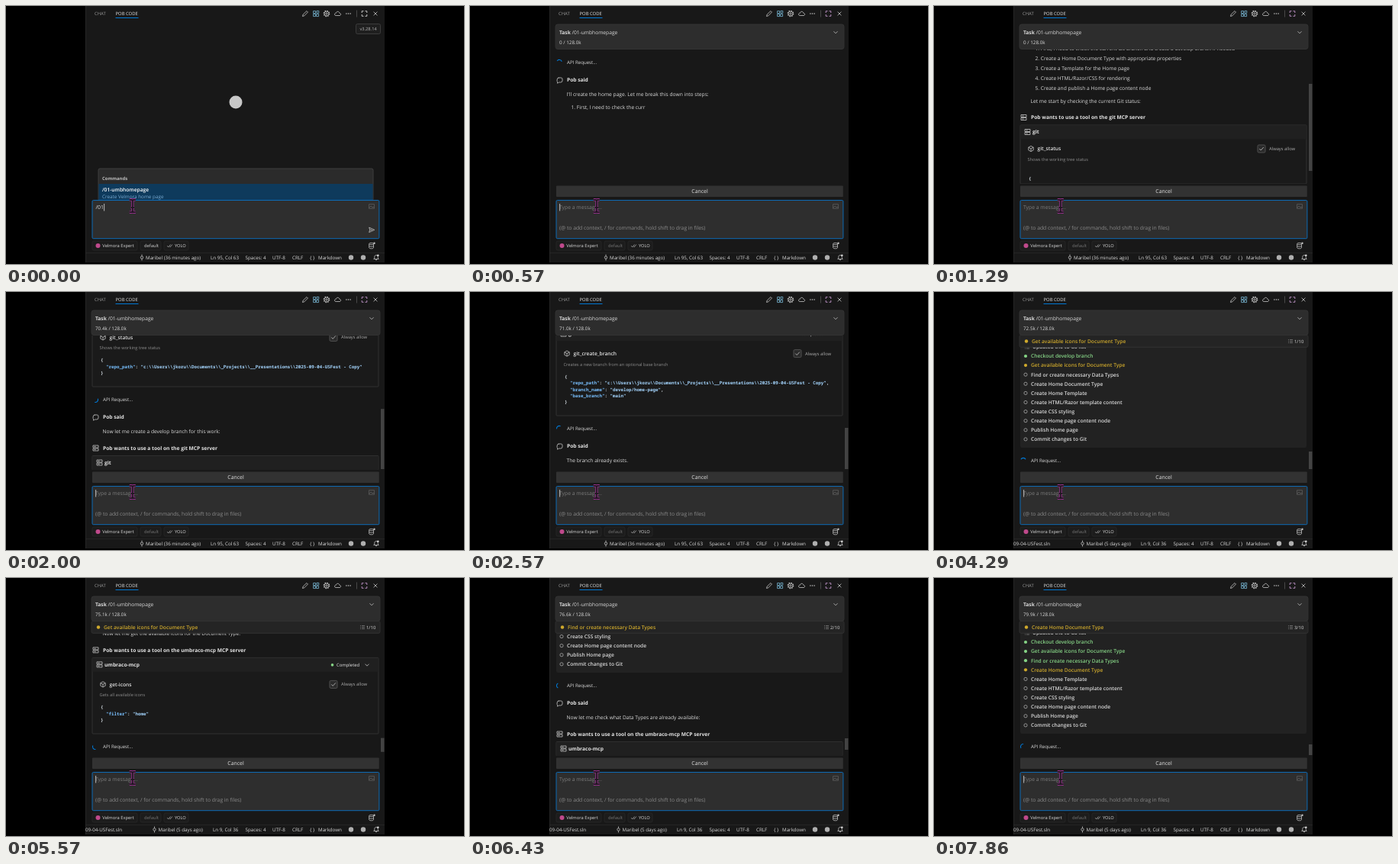
Animation, 600 px wide and 338 px high, one loop 8000 ms. Source, as an HTML page:

```html
<!DOCTYPE html>
<html lang="en">
<head>
<meta charset="utf-8">
<title>Assistant panel</title>
<style>
  html, body { margin: 0; width: 100%; height: 100%; overflow: hidden; background: #000; }
  svg { display: block; width: 100vw; height: 100vh; }
  text { font-family: "Open Sans", "Noto Sans", sans-serif; white-space: pre; text-rendering: geometricPrecision; }
  text.mono { font-family: "Noto Sans Mono", "DejaVu Sans Mono", monospace; }
</style>
</head>
<body>
<svg id="stage" viewBox="0 0 600 338"></svg>
<script>
const LOOP = 8000, STEPS = 56, BOTTOM = 233;
const BLUE = '#0078d4', GREEN = '#86d486', YELLOW = '#cfa92c', GREY = '#8c8c8c', LIGHT = '#dadada', LINE = '#c4c4c4';

// Drawing helpers; text is placed by its vertical centre
const text = (x, y, str, fill = LIGHT, size = 6.66, weight = 400, extra = '') =>
  `<text x="${x}" y="${y + size * .36}" fill="${fill}" font-size="${size}" font-weight="${weight}" ${extra}>${str}</text>`;
const rect = (x, y, w, h, fill, stroke = 'none', r = 0) =>
  `<rect x="${x}" y="${y}" width="${w}" height="${h}" rx="${r}" fill="${fill}" stroke="${stroke}" stroke-width=".9"/>`;
const circle = (x, y, r, fill, stroke = 'none') =>
  `<circle cx="${x}" cy="${y}" r="${r}" fill="${fill}" stroke="${stroke}" stroke-width=".8"/>`;
const line = (d, stroke = LINE, width = .8, fill = 'none') =>
  `<path d="${d}" fill="${fill}" stroke="${stroke}" stroke-width="${width}"/>`;
const at = (x, y, body) => `<g transform="translate(${x} ${y})">${body}</g>`;

// Keyed values: held until the next key, or blended between keys
const held = (keys, s) => keys.filter(k => k[0] <= s).pop()[1];
const blend = (keys, s, col = 1) => {
  const i = keys.findIndex(k => k[0] >= s);
  if (i < 0) return keys[keys.length - 1][col];
  if (i === 0) return keys[0][col];
  const a = keys[i - 1], b = keys[i];
  return a[col] + (b[col] - a[col]) * (s - a[0]) / (b[0] - a[0]);
};

const TOKENS = [[0, '0'], [11, '70.4k'], [16, '71.0k'], [22, '71.4k'], [27, '72.5k'], [38, '75.1k'], [42, '76.6k'], [52, '79.9k']];
const SPIN = [[2, -900], [18, -125], [24, 315], [30, 630], [45, 1620], [55, 2370]];
const THUMB = [[6, 57, 233], [9, 102, 216], [13, 147, 232], [18, 178, 232], [24, 192, 232], [30, 209, 232], [45, 210, 225], [55, 218, 232]];
const PROGRESS = [[0, 0], [27, 1], [42, 2], [52, 3]];
const TODOS = ['Checkout develop branch', 'Get available icons for Document Type', 'Find or create necessary Data Types',
  'Create Home Document Type', 'Create Home Template', 'Create HTML/Razor template content', 'Create CSS styling',
  'Create Home page content node', 'Publish Home page', 'Commit changes to Git'];

const icon = {
  server: line('M-3.5-3.5h7v3h-7zM-3.5.5h7v3h-7zM-2-2h2M-2 2h2'),
  bubble: line('M-2-3H2Q3.5-3 3.5-1V1Q3.5 3 1 3H-1L-3 4.2V2.5Q-3.5 2-3.5 0Q-3.5-3-1-3'),
  cube: line('M0-3.6L3.2-1.8V1.8L0 3.6-3.2 1.8V-1.8ZM-3.2-1.8L0 0 3.2-1.8M0 0V3.6'),
  chevron: line('M-2.5-1.2L0 1.3 2.5-1.2'),
  list: line('M-1-2H3M-1 0H3M-1 2H3M-3-2h1M-3 0h1M-3 2h1', GREY, .7),
  commit: circle(0, 0, 1.7, 'none', LINE) + line('M0-4V-1.7M0 1.7V4'),
};

// Transcript blocks: each returns [height, markup]
const blocks = {
  api: (e, s) => [29, at(117, 17, s >= e.done
    ? line('M-2.5 0L-.7 2 3-2', GREEN)
    : `<g transform="rotate(${blend(SPIN, s)})">${line('M1.7-3.1A3.5 3.5 0 0 1 1.7 3.1', BLUE, 1.1)}</g>`)
    + text(127, 17, s >= e.done ? 'API Request' : 'API Request...', LIGHT, 6.15)],

  said(e, s) {
    let left = (s - e.at + 1) * e.rate, y = 30, previous = null;
    let body = at(117.5, 11, icon.bubble) + text(127, 11, 'Pob said', '#e4e4e4', 6.66, 700);
    for (const str of e.lines) {
      if (left <= 0) break;
      const numbered = /^\d/.test(str);
      if (previous !== null) y += numbered && previous ? 13 : 17;
      body += text(numbered ? 132.5 : 126.5, y, str.slice(0, left));
      left -= str.length;
      previous = numbered;
    }
    return [y + 12, body];
  },

  wants: e => [19.5, at(117.5, 9.5, icon.server)
    + text(127, 9.5, `Pob wants to use a tool on the ${e.server} MCP server`, '#e4e4e4', 6.66, 700)],

  tool(e, s) {
    const done = s >= e.done, stage = s - e.at, shift = done ? 4 : 0;
    const shown = done ? e.args : e.args.slice(0, Math.max(0, stage - 1));
    const jsonY = done ? 65 : 70;
    const h = done ? 91.2 + 8.4 * e.args.length : stage < 1 ? 18.5 : 77 + 8.4 * shown.length;
    let body = rect(113, 0, 375, h, '#1a1a1a', '#343434', 1) + rect(113.4, .4, 374.2, 18, '#202020')
      + at(122.5, 9, icon.server) + text(129, 9, e.server, '#e4e4e4', 6.66, 700);
    if (done) body += circle(427.5, 9.5, 1.8, GREEN) + text(433, 9, 'Completed', '#e4e4e4', 5.9) + at(473, 9.5, icon.chevron);
    if (!done && stage < 1) return [h, body];
    body += at(127, 31 + shift, icon.cube) + text(135.5, 31 + shift, e.name, '#e4e4e4', 6.66, 600)
      + rect(424, 26 + shift, 10, 10, '#2b2b2b', '#555', 1.5) + at(429, 31 + shift, line('M-2.7 0L-.8 2 2.8-2'))
      + text(439, 31 + shift, 'Always allow', '#adadad', 5.8)
      + text(122.5, 45 + shift, e.desc, GREY, 5.7);
    const mono = (x, i, str) => text(x, jsonY + i * 8.45, str, '#d6dde4', 5.84, 600, 'class="mono"');
    body += mono(124, 0, '{');
    shown.forEach(([key, value], i) => body += mono(131, i + 1,
      `<tspan fill="#79c0ff">"${key}"</tspan>: <tspan fill="#a5d6ff">"${value}"</tspan>${i < e.args.length - 1 ? ',' : ''}`));
    if (done) body += mono(124, shown.length + 1, '}');
    return [h, body];
  },

  todo(e) {
    let body = rect(113, 0, 375, 142, '#222', 'none', 2) + at(122, 10, icon.list) + text(129, 10, 'Updated the to-do list', LIGHT, 6.66, 600);
    TODOS.forEach((str, i) => {
      const color = i < e.count ? GREEN : i === e.count ? YELLOW : LIGHT, y = 22 + i * 12.1;
      body += circle(120, y, 2.1, i <= e.count ? color : 'none', i <= e.count ? 'none' : '#aaa')
        + text(127, y, str, color, 6.66, 600);
    });
    return [142, body];
  },
};

const REPO = ['repo_path', 'c:\\\\Users\\\\jkoru\\\\Documents\\\\_Projects\\\\__Presentations\\\\2025-09-04-USFest - Copy'];
const api = (at, done) => ({ kind: 'api', at, done });
const said = (at, rate, ...lines) => ({ kind: 'said', at, rate, lines });
const todo = (at, count) => ({ kind: 'todo', at, count });
const tool = (at, done, server, name, desc, ...args) =>
  [{ kind: 'wants', at: at - 1, server }, { kind: 'tool', at, done, server, name, desc, args }];

const TRANSCRIPT = [
  api(2, 11),
  said(4, 95, "I'll create the home page. Let me break this down into steps:",
    '1. First, I need to check the current Git branch and create a develop branch if needed',
    '2. Create a Home Document Type with appropriate properties',
    '3. Create a Template for the Home page',
    '4. Create HTML/Razor/CSS for rendering',
    '5. Create and publish a Home page content node',
    'Let me start by checking the current Git status:'),
  ...tool(8, 11, 'git', 'git_status', 'Shows the working tree status', REPO),
  api(11, 16),
  said(12, 30, 'Now let me create a develop branch for this work:'),
  ...tool(14, 16, 'git', 'git_create_branch', 'Creates a new branch from an optional base branch',
    REPO, ['branch_name', 'develop/home-page'], ['base_branch', 'main']),
  api(16, 22),
  said(17, 13, 'The branch already exists. Let me switch to it:'),
  ...tool(20, 22, 'git', 'git_checkout', 'Switches branches', REPO, ['branch_name', 'develop/home-page']),
  api(22, 27),
  said(23, 25, "Good! Now I'm on the develop branch. Let me create a todo list to track the work:"),
  todo(27, 1),
  api(27, 38),
  said(32, 26, 'Now let me get the available icons for the Document Type:'),
  ...tool(35, 38, 'umbraco-mcp', 'get-icons', 'Gets all available icons', ['filter', 'home']),
  api(38, 42),
  todo(42, 2),
  api(42, 48),
  said(43, 30, 'Now let me check what Data Types are already available:'),
  ...tool(45, 48, 'umbraco-mcp', 'get-all-data-types', 'Gets all available data types', ['take', '100']),
  api(48, 52),
  todo(52, 3),
  api(52, 60),
];

function transcript(s) {
  let y = BOTTOM, out = '';
  const shown = TRANSCRIPT.filter(e => e.at <= s);
  while (shown.length && y > 50) {
    const e = shown.pop(), [h, body] = blocks[e.kind](e, s);
    y -= h;
    out += at(0, y, body);
  }
  // Short transcripts sit at the top
  return at(0, Math.min(0, 57 - y), out);
}

function toolbar(idle) {
  const gear = circle(0, 0, 3, 'none', LINE) + circle(0, 0, 1.2, 'none', LINE)
    + `<circle r="3.7" fill="none" stroke="${LINE}" stroke-width="1.2" stroke-dasharray="1.45 1.45"/>`;
  return text(116, 10, 'CHAT', '#9a9a9a', 5.9) + text(143.5, 10, 'POB CODE', '#e4e4e4', 5.9)
    + rect(143.5, 15, 30, 1, BLUE)
    + at(392, 10, line('M-3.5 3.5L-2.8 1 2-3.5 3.5-2-1.2 2.8Z'))
    + at(406, 10, line('M-3.4-3.4h3v3h-3zM-3.4.6h3v3h-3zM.6.6h3v3h-3zM1-3.6h2.8v2.8H1z', '#79b9d6', .8))
    + at(420, 10, gear)
    + at(434.5, 10, line('M-2.3 2.5C-5 2.3-4.3-1-2-.8C-1.5-3.5 2-3.2 2.2-.8C4.8-.7 4.5 2.5 2.5 2.5Z'))
    + [-2.6, 0, 2.6].map(d => circle(448.5 + d, 10, .8, LINE)).join('')
    + rect(459, 5.5, .8, 9, '#555')
    + at(469.5, 10, line('M-3.3-1V-3.3H-1M1-3.3H3.3V-1M3.3 1V3.3H1M-1 3.3H-3.3V1', idle ? LINE : '#b48cbd', 1))
    + at(484, 10, line('M-2.4-2.4L2.4 2.4M2.4-2.4L-2.4 2.4'));
}

function taskHeader(s) {
  const count = held(PROGRESS, s);
  let out = rect(112, 24, 378, 32.5, '#2d2d2d', '#353535', 3)
    + text(117, 34.5, '<tspan font-weight="700">Task</tspan> /01-umbhomepage')
    + at(479, 34.5, icon.chevron) + text(117, 47.5, held(TOKENS, s) + ' / 128.0k', LIGHT, 6.3);
  if (count) out += rect(112, 56.5, 378, 15.8, '#242424', '#333', 2) + circle(121, 64.5, 2.2, YELLOW)
    + text(128, 64.5, TODOS[count], YELLOW, 6.66, 600)
    + at(467, 64.5, icon.list) + text(472, 64.5, count + '/10', LIGHT, 5.9);
  return out;
}

const welcome = () => rect(458.5, 23.5, 32, 13, '#1f1f1f', '#404040', 2) + text(463.5, 30, 'v3.28.14', '#b5b5b5', 5.7)
  + circle(301, 126, 8.5, '#c8c8c8');

const popup = () => rect(121, 213, 360, 42, '#2b2b2b', '#424242', 2) + text(126, 225.5, 'Commands', '#bdbdbd', 5.9, 700)
  + rect(121.4, 233, 359.2, 21.5, '#0e3a5c') + text(126, 240.5, '/01-umbhomepage', '#fff', 6.66, 600)
  + text(126, 249.3, 'Create Velmora home page', '#78aad2', 6.35);

function inputBox(s, idle) {
  const typed = s === 0 ? '/01' : '/01-umbhomepage';
  let out = rect(113, 254.5, 375.9, 50.2, '#2e2e2e', '#0b72c4', 1.5);
  out += idle ? text(117.5, 263.5, typed, '#e4e4e4', 6.9)
    : text(117, 264, 'Type a message...', '#7c7c7c', 6.8)
      + text(117, 290.5, '(@ to add context, / for commands, hold shift to drag in files)', '#8a8a8a', 6.8);
  if (s % 4 !== 1) out += rect(idle ? 128.3 : 117.3, 259, .8, 9.5, '#ddd');
  out += at(479, 262.5, line('M-3.4-2.8H3.4V2.8H-3.4ZM-3.4 2L-1-.5 1 1.5 2 .5 3.4 2', '#666', .7));
  if (idle) out += at(479, 293.3, line('M-3.3-3.2L3.7 0-3.3 3.2-2.3 0ZM-2.3 0H1'));
  return out;
}

function modeBar(idle) {
  const pill = (x, w) => rect(x, 308, w, 12, '#1c1c1c', '#282828', 2);
  return pill(113, 59) + pill(176, 27) + pill(207, 32)
    + circle(120.5, 314, 3, '#c0498c') + text(126.3, 314, 'Velmora Expert', LIGHT, 5.8)
    + text(181, 314, 'default', idle ? LIGHT : '#777', 5.75)
    + at(214.5, 314, line('M-3.3.2L-1.8 1.8 1-1.5M0 1.2L.5 1.8 3.3-1.5', LINE, .7)) + text(221, 314, 'YOLO', LIGHT, 5.7)
    + at(479, 314, line('M-3.3-2.5C-3.3-4 2.5-4 2.5-2.5V2.8C2.5 4.2-3.3 4.2-3.3 2.8ZM-3.3-2.5C-3.3-1 2.5-1 2.5-2.5M-3.3 .2C-3.3 1.6 2.5 1.6 2.5 .2'))
    + circle(482.5, 310.8, 1.2, LINE);
}

function statusBar(s) {
  const moved = s >= 22, item = (x, str) => text(x, 329.5, str, LIGHT, 6.24);
  return rect(104, 323, 392, .7, '#2b2b2b')
    + (moved ? item(104, '09-04-USFest.sln') : '')
    + at(moved ? 194.5 : 178, 329.5, icon.commit)
    + item(moved ? 199.5 : 183, moved ? 'Maribel (5 days ago)' : 'Maribel (36 minutes ago)')
    + (moved ? item(271, 'Ln 9, Col 36') : item(268, 'Ln 95, Col 63'))
    + item(313.5, 'Spaces: 4') + item(349, 'UTF-8') + item(375, 'CRLF')
    + item(398, '{ }') + item(409, 'Markdown')
    + circle(452, 329.5, 3.2, '#b0b0b0') + circle(468, 329.5, 3.2, '#b0b0b0')
    + at(485, 329.5, line('M-3.2 2H3.2L2.2.5V-1C2.2-3.8-2.2-3.8-2.2-1V.5ZM-1 2.8Q0 4 1 2.8')) + circle(487.3, 326.8, 1.3, LIGHT);
}

// Dark I-beam with a coloured rim
const pointer = () => {
  const beam = 'M161.8 253.8H164.2Q165.8 253.8 165.8 256V268Q165.8 270.2 164.2 270.2H161.8M169.8 253.8H167.4Q165.8 253.8 165.8 256M169.8 270.2H167.4Q165.8 270.2 165.8 268M163.6 264.2H168';
  return line(beam, '#96318c', 3.4) + line(beam, '#1f171f', 1.8);
};

function frame(s) {
  const idle = s < 2, top = held(PROGRESS, s) ? 72 : 57;
  let out = `<clipPath id="panel">${rect(104, 0, 392, 336)}</clipPath>
    <clipPath id="chat">${rect(104, top, 392, BOTTOM - top)}</clipPath>`;
  let body = rect(104, 0, 392, 336, '#181818') + rect(104, 0, .7, 336, '#2b2b2b') + toolbar(idle);
  if (idle) body += welcome() + (s === 0 ? popup() : '');
  else {
    const thumbTop = blend(THUMB, s), thumbEnd = blend(THUMB, s, 2);
    body += `<g clip-path="url(#chat)">${transcript(s)}</g>` + taskHeader(s)
      + (s > 6 ? rect(491, thumbTop, 4.5, thumbEnd - thumbTop, '#434343') : '')
      + rect(113, 235.5, 375.8, 14.5, '#323232', 'none', 1)
      + text(301, 243, 'Cancel', '#e4e4e4', 6.9, 400, 'text-anchor="middle"');
  }
  body += inputBox(s, idle) + modeBar(idle) + statusBar(s) + pointer();
  return out + `<g clip-path="url(#panel)">${body}</g>`;
}

const stage = document.getElementById('stage');
let current = -1;
function tick() {
  // Small lead so that rounded step times land on their own step
  const step = Math.floor((performance.now() + 5) % LOOP / LOOP * STEPS);
  if (step !== current) stage.innerHTML = frame(current = step);
  requestAnimationFrame(tick);
}
tick();
</script>
</body>
</html>
```
